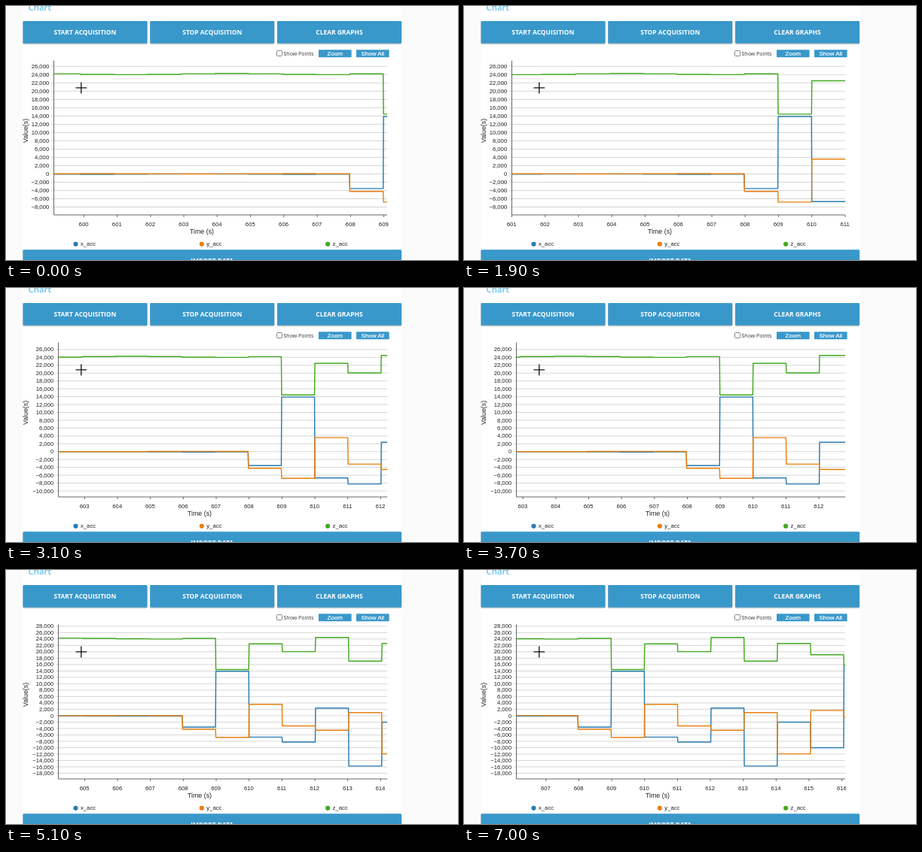
An HTML page that plays this animation: 600x338 px, repeating every 7100 ms.

```html
<!DOCTYPE html>
<html>
<head>
<meta charset="utf-8">
<style>
html, body { margin: 0; width: 100%; height: 100%; overflow: hidden; background: #fcfbfc; }
svg { display: block; width: 600px; height: 338px; }
text { font: 7.7px "Liberation Sans", Arial, sans-serif; fill: #222; }
.mid { text-anchor: middle; }
.end { text-anchor: end; }
.title { font-size: 8.8px; }
.head { font: 600 11.4px "Open Sans", sans-serif; fill: #68c1ea; }
.big { font: 700 8.45px "Open Sans", sans-serif; fill: #fff; text-anchor: middle; }
.small { font-size: 8px; fill: #fff; stroke: #fff; stroke-width: .2; text-anchor: middle; }
.check { font: 7px "Open Sans", sans-serif; fill: #333; }
.btn { fill: #3998ca; }
.shadow { fill: #000; opacity: .2; }
.grid { stroke: #d2d2d2; stroke-width: .9; }
.axis { stroke: #666; stroke-width: 1; fill: none; }
.line { fill: none; stroke-width: 1.45; stroke-linejoin: round; }
</style>
</head>
<body>
<svg viewBox="0 0 600 338">
  <defs><clipPath id="clip"><rect id="clipBox" y="72" height="207"/></clipPath></defs>
  <rect x="22.5" width="502.5" height="338" fill="#fff"/>
  <text class="head" x="29.5" y="5.6">Chart</text>
  <g id="buttons"></g>
  <rect x="359.5" y="59.5" width="7" height="7" rx="1" fill="#fff" stroke="#777" stroke-width=".9"/>
  <text class="check" x="368.5" y="65.8">Show Points</text>
  <g id="chart"></g>
  <g id="legend"></g>
  <text class="title mid" transform="translate(29 166) rotate(-90)">Value(s)</text>
  <path d="M92.5 108.9H107.2M99.8 101.5V116.4" stroke="#111" stroke-width="1.3"/>
</svg>
<script>
const LOOP = 7100, STEP = 100;
const RIGHT = 506, TOP = 72.6, BOTTOM = 278, SPAN = 10;
const FIRST = 599, CALM = 9, COUNT = 18, RAMP = 0.01;

// a gentle wave around rest while the sensor lies still, then one level per move
const series = [
  { name: 'x_acc', color: '#2a7cb0', rest: -40, swing: 50, peak: 4,
    moves: [-3530, 13900, -6700, -8250, 2400, -15750, -2000, -10000, 15800] },
  { name: 'y_acc', color: '#e8800f', rest: 30, swing: 40, peak: 7,
    moves: [-4250, -6800, 3570, -3180, -4550, 970, -11930, 1650, -400] },
  { name: 'z_acc', color: '#42aa20', rest: 24140, swing: 150, peak: 5,
    moves: [24180, 14450, 22500, 20050, 24500, 17100, 22600, 19100, 15800] }
];

const $ = id => document.getElementById(id);
const level = (s, i) => i < CALM
  ? s.rest + s.swing * Math.cos((i - s.peak) * Math.PI / 3)
  : s.moves[i - CALM];
const stepTime = i => 608.98 + (i + FIRST - 609) * 1.0105;
const fmt = v => (v < 0 ? '\u2212' : '') + Math.abs(v).toLocaleString('en-US');

function button(x, y, w, h, cls, label, base) {
  const big = cls === 'big';
  const shadow = big
    ? `<rect class="shadow" x="${x - .3}" y="${y + 1}" width="${w + .6}" height="${h + .5}" rx="2"/>` : '';
  return shadow + `<rect class="btn" x="${x}" y="${y}" width="${w}" height="${h}" rx="${big ? 1.2 : .6}"/>` +
    `<text class="${cls}" x="${x + w / 2}" y="${base}">${label}</text>`;
}

$('buttons').innerHTML =
  ['START ACQUISITION', 'STOP ACQUISITION', 'CLEAR GRAPHS']
    .map((label, i) => button(22.5 + i * 168.75, 20, 165, 29.8, 'big', label, 38)).join('') +
  button(22.5, 324.2, 502.5, 29.8, 'big', 'IMPORT DATA', 342) +
  ['Zoom', 'Show All']
    .map((label, i) => button(415 + i * 50, 58.2, 43.6, 10, 'small', label, 66)).join('');

$('legend').innerHTML = series.map((s, i) => {
  const x = 92.5 + i * 167.3;
  return `<circle cx="${x}" cy="316.8" r="3.1" fill="${s.color}"/>` +
    `<text x="${x + 6.5}" y="319.2">${s.name}</text>`;
}).join('');

function draw(ms) {
  const now = 609.1 + ms / 1000, start = now - SPAN;
  const steps = [...Array(COUNT).keys()];
  const last = steps.findLastIndex(i => stepTime(i) <= now);
  const first = Math.max(0, steps.findLastIndex(i => stepTime(i) <= start));
  const shownSteps = steps.slice(first, last + 1);

  // range of the visible data, padded by a tenth
  const seen = series.flatMap(s => shownSteps.map(i => level(s, i)));
  const lo = Math.min(...seen), hi = Math.max(...seen), pad = (hi - lo) / 10;
  const min = lo - pad, max = hi + pad;
  const wide = min <= -10000;
  const left = wide ? 69.5 : 63.5;

  const px = t => RIGHT - (now - t) * (RIGHT - left) / SPAN;
  const py = v => TOP + (max - v) / (max - min) * (BOTTOM - TOP);

  let out = '';
  for (let v = Math.ceil(min / 2000) * 2000; v <= max; v += 2000) {
    const y = py(v);
    out += `<path class="grid" d="M${left - 3} ${y}H${RIGHT}"/>` +
      `<text class="end" x="${left - 6.3}" y="${y + 2.6}">${fmt(v)}</text>`;
  }
  out += `<path class="axis" d="M${left} ${TOP}V${BOTTOM}H${RIGHT}"/>`;
  for (let t = Math.ceil(start); t <= now; t++) {
    const x = px(t);
    out += `<path class="axis" d="M${x} ${BOTTOM}v3"/>` +
      `<text class="mid" x="${x - .3}" y="292.9">${t}</text>`;
  }
  out += `<text class="title mid" x="${wide ? 257 : 260}" y="302.8">Time (s)</text><g clip-path="url(#clip)">`;
  for (const s of series) {
    let d = `M${left} ${py(level(s, first))}`;
    for (const i of shownSteps.slice(1)) {
      const t = stepTime(i);
      d += `H${px(t)}L${px(t + RAMP)} ${py(level(s, i))}`;
    }
    out += `<path class="line" stroke="${s.color}" d="${d}H${RIGHT}"/>`;
  }
  $('clipBox').setAttribute('x', left);
  $('clipBox').setAttribute('width', RIGHT + .3 - left);
  $('chart').innerHTML = out + '</g>';
}

let begin = null, shown = -1;
function tick(time) {
  if (begin === null) begin = time;
  const ms = Math.floor(Math.max(0, time - begin) % LOOP / STEP) * STEP;
  if (ms !== shown) draw(shown = ms);
  requestAnimationFrame(tick);
}
draw(0);
requestAnimationFrame(tick);
</script>
</body>
</html>
```
